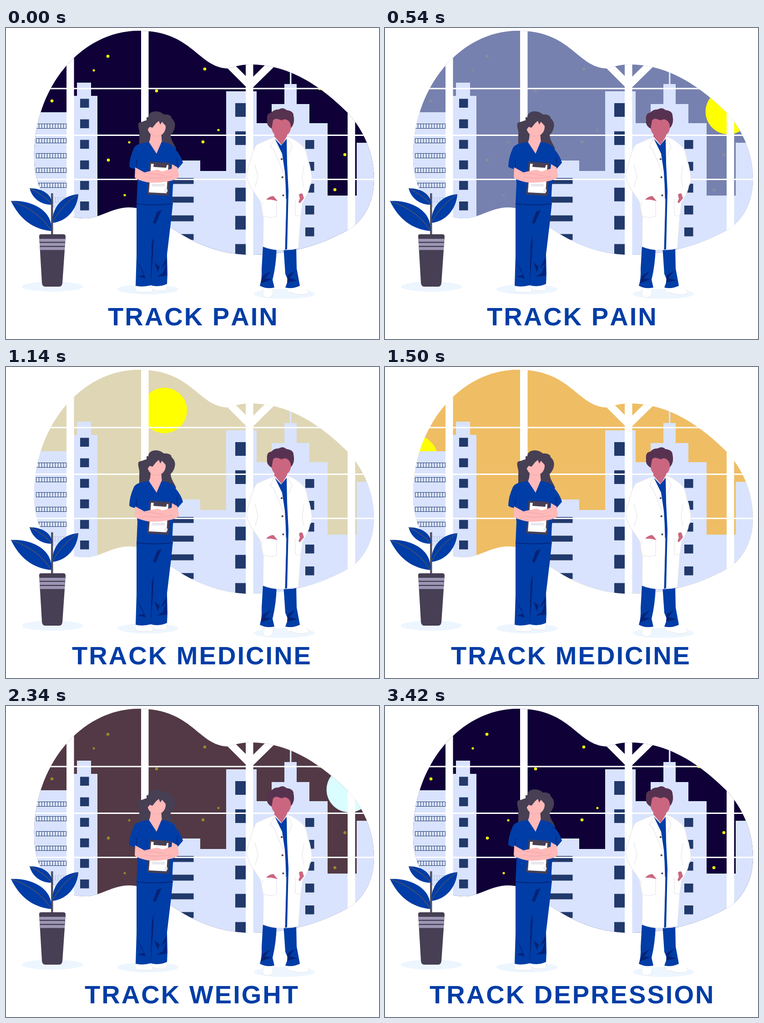
Animation of 820 by 683 pixels, one loop 3600 ms. Source, as an HTML page with a canvas:

```html
<!DOCTYPE html>
<html lang="en">
<head>
<meta charset="utf-8">
<title>Health tracking</title>
<style>
html, body { margin: 0; width: 100%; height: 100%; overflow: hidden; background: #fff; }
canvas { display: block; width: 820px; height: 683px; }
</style>
</head>
<body>
<canvas id="stage" width="820" height="683"></canvas>
<script>
const ctx = document.getElementById('stage').getContext('2d');

const LOOP = 3600, STEP = 60, LAST = 3420, HALF = LOOP / 2, QUARTER = LOOP / 4;
const BLUE = '#003da6', NAVY = '#21396b', FOLD = '#062276', TOWER = '#d9e3fd';
const PLUM = '#473f53', STEM = '#515064', SKIN = '#ffb9b9', ROSE = '#cb6680', GREY = '#e4e4e8';
const NIGHT = [15, 0, 55], DAY = [186, 213, 252], SAND = [223, 214, 181], AMBER = [239, 189, 100];

const captions = [
  ['TRACK PAIN', 224], ['TRACK MEDICINE', 145],
  ['TRACK WEIGHT', 173], ['TRACK DEPRESSION', 98]
];
const skyStops = [[0, NIGHT], [890, DAY], [1140, SAND], [1500, AMBER], [2700, NIGHT]];

const blob = new Path2D(`M62 290C58 132 165 6 292 6C410 6 422 87 488 89C503 84 520 80 537 80
  C620 80 690 125 751 186C790 228 809 280 809 332C809 385 785 425 751 444
  C690 478 620 498 540 498C465 498 410 470 365 440C335 417 310 394 270 394
  C235 394 205 418 175 418C95 418 62 345 62 290Z`);

function fill(color, d) {
  ctx.fillStyle = color;
  ctx.fill(new Path2D(d));
}

function line(color, width, d) {
  ctx.strokeStyle = color;
  ctx.lineWidth = width;
  ctx.stroke(new Path2D(d));
}

function rect(color, x, y, w, h) {
  ctx.fillStyle = color;
  ctx.fillRect(x, y, w, h);
}

function oval(color, x, y, rx, ry = rx) {
  ctx.fillStyle = color;
  ctx.beginPath();
  ctx.ellipse(x, y, rx, ry, 0, 0, 7);
  ctx.fill();
}

const clamp = v => Math.max(0, Math.min(1, v));

function skyColor(t) {
  const i = Math.max(1, skyStops.findIndex(([time]) => time > t));
  if (t >= 2700) return NIGHT;
  const [t0, from] = skyStops[i - 1], [t1, to] = skyStops[i];
  return from.map((v, j) => Math.round(v + (to[j] - v) * (t - t0) / (t1 - t0)));
}

function drawSky(t) {
  rect(`rgb(${skyColor(t)})`, 0, 0, 820, 500);

  // Zero-length round strokes make the stars
  ctx.globalAlpha = clamp(1 - t / 600) + clamp((t - 2100) / 600);
  ctx.lineCap = 'round';
  line('#ff0', 6.7, `M224 62h0M101 160h0M331 138h0M437 90h0M225 290h0M433 250h0
    M690 133h0M745 278h0M723 355h0`);
  line('#ff0', 5.1, 'M193 93h0M271 251h0M467 224h0M261 367h0');
  ctx.lineCap = 'butt';
  ctx.globalAlpha = 1;

  // Sun and moon share one arc, half a loop apart, fastest near the top
  const x = 323 - 608 * Math.atan((t % HALF - 1170) / 733);
  const y = 731 - Math.sqrt(Math.max(0, 640 ** 2 - (x - 423) ** 2));
  oval(t < HALF ? '#ff0' : '#dafeff', x, y, 50);
}

function drawCity() {
  fill(TOWER, `M60 500V185H145V149H156V120H187V149H201V500H350V291H427V314H484V139H551V209H584
    V167H612V123H624V90H627.5V123H639V167H667V209H707V368H771V252H820V500Z`);

  ctx.strokeStyle = NAVY;
  ctx.lineWidth = 1;
  for (let row = 0; row < 6; row++) {
    ctx.globalAlpha = row < 5 ? 1 : 0.13;
    for (let x = 66.5; x < 133; x += 6) ctx.strokeRect(x, Math.round(210 + row * 32.4) + 0.5, 6, 10);
  }
  ctx.globalAlpha = 1;

  for (let i = 0; i < 6; i++) {
    rect(NAVY, 163, 155.5 + i * 45.1, 19.5, 19.5);
    rect(NAVY, 504, 165 + i * 61.9, 26, 30);
    if (i < 5) rect(NAVY, 658, 246 + i * 48, 19.5, 19.5);
    if (i < 4) rect(NAVY, 355, 329.5 + i * 41, 57.5, 13);
  }
}

function drawWindow() {
  for (const x of [133, 297, 527, 751]) rect('#fff', x, 0, 16.5, 500);
  for (const y of [131.5, 234, 331]) rect('#fff', 0, y, 820, 3);
  line('#fff', 16.5, 'M470 60L536 126L603 60');
}

function drawPlant() {
  rect(STEM, 99, 363, 4.5, 92);
  fill(BLUE, `M11 380C50 377 104 397 100 446C58 442 29 418 11 380Z
    M52 352C80 352 101 365 102 388C79 389 58 376 52 352Z
    M159 365C157 397 134 425 102 428C101 390 128 367 159 365Z`);
  line(STEM, 1.4, 'M11 380Q72 400 100 446M52 352Q82 366 102 388M159 365Q122 390 102 427');
  fill(PLUM, 'M77 453H126Q131 453 131 458L124 560Q123 568 117 568H86Q80 568 79 560L73 459Q72 453 77 453Z');
  for (let i = 0; i < 3; i++) rect('#9d97b5', 73 + i, 463 + i * 9, 57 - i * 1.5, 6.5);
}

function drawNurse() {
  fill('#fff', 'M286 568Q282 580 292 580H322Q326 572 314 566ZM318 566Q323 577 333 577H351Q357 570 350 562Z');
  line(GREY, 1, 'M285 572Q283 580 292 580H322Q326 574 318 569M322 573Q326 577 334 577H351Q357 571 352 565');

  // Hair, neck and face
  fill(PLUM, `M313 197C312 188 320 183 329 183S344 187 347 190C358 189 364 193 364 198
    Q374 206 371 219Q369 228 362 235C362 247 372 257 374 266L350 268H293V235
    C295 228 289 217 291 210C292 206 299 207 304 204Q312 203 313 197Z`);
  fill(SKIN, 'M318 230H341L343 254L331 279L313 253Q318 246 318 230Z');
  oval(SKIN, 331, 217.5, 20, 20.5);
  fill(PLUM, 'M309 226L316 217L322 219L330 209L336 204L339 212L343 206L352 216V196H309Z');
  line('#eda9ad', 1, 'M319 234Q330 241 341 235');

  // Trousers
  fill(BLUE, 'M287 384H367L362 430L354 497L355 540L354 562Q337 570 318 565Q299 570 285 566L287 500Z');
  fill(FOLD, `M287 510L300 532L307 550L290 546L303 542ZM326 515L338 524L334 536Z
    M353 504L340 529L352 517L345 538L332 546L353 544ZM329 430L342 400L332 404L323 428Z
    M320 475L325 456L323 500L318 565Z`);

  // Top
  fill(BLUE, `M314 250C300 253 286 254 281 264Q271 286 271 305Q278 310 286 309L289 340L287 387
    Q326 392 365 387L367 345L377 310L389 296Q385 281 373 267C369 254 353 252 342 250L331 276Z`);
  line(FOLD, 1.3, 'M287 386Q326 391 366 386M286 309L287 290M377 306L376 285');

  // Clipboard and arms
  line(PLUM, 5, 'M318 296L359 299L355 366L313 363Z');
  fill('#fff', 'M319 298L357 301L353 363L314 361Z');
  fill(PLUM, 'M325 298L354 300L352 307L324 305Z');
  fill('#e7e8ef', 'M321 342H349V348H321ZM349 354H355V360H348Z');
  fill(SKIN, `M284 306L304 317L333 311L344 315L364 309L365 299L377 306L380 324
    C380 330 370 334 360 336C342 340 319 341 307 338C297 335 286 333 283 328Z`);
  line('#eda2a8', 1, 'M302 318Q326 320 348 324M304 327Q326 333 365 326');
}

function drawDoctor() {
  fill('#fff', 'M567 570Q560 592 575 592T587 571ZM618 570Q614 582 627 581Q643 588 663 584Q674 575 645 567Z');
  line(GREY, 1, 'M566 573Q560 592 575 592T587 572M618 573Q614 582 627 581Q643 588 663 584Q669 578 661 574');

  // Trousers
  fill(BLUE, `M565 478L595 482Q594 520 586 553L590 570Q572 574 558 566Q563 551 562 529Z
    M610 480L638 479L639 528L646 566Q630 574 614 570L620 554L614 540Z`);
  fill(FOLD, 'M565 544L582 534L569 550L584 552L560 561ZM619 543L636 533L623 549L640 554L618 559Z');

  // Head
  fill(ROSE, 'M590 230L618 228V248L609 264L590 243Z');
  fill(ROSE, 'M583 200V214Q584 238 605 238T627 214V198Z');
  fill('#573250', `M584 221Q572 214 574 203Q572 187 583 186Q590 178 599 179Q609 173 616 180
    Q632 182 632 192Q636 210 626 220Q627 211 622 205Q614 197 606 203Q592 196 587 203Z`);

  // Coat, scrubs, seams
  const coat = `M591 240L576 245L551 256C544 265 541 278 537 291L530 316
    C526 326 535 344 539 351L559 381L566 416L565 480Q590 490 618 487Q634 487 643 483
    L648 413L652 383Q666 362 668 346Q675 337 671 318L667 299C661 285 663 271 654 261
    Q645 252 630 243L618 238L606 258Z`;
  fill('#fff', coat);
  line(GREY, 1.2, coat);
  fill(BLUE, 'M591 243L605 258L617 243L618 298L621 358L618 486L613 487L615 425Q617 370 613 316L607 276Z');
  line(GREY, 1.2, `M590 242L581 261L588 266L611 320M618 240L629 260L621 279M616 375L613 486
    M547 300L554 326L548 349M655 302L651 330L655 350
    M565 383Q560 388 562 412Q580 419 595 414V379M636 376V411Q645 415 650 411`);

  // Hands and buttons
  fill(ROSE, 'M572 377Q579 369 588 369L597 380L583 377ZM644 366Q647 362 652 364L655 374L646 385L643 382L646 375Z');
  for (let i = 0; i < 3; i++) oval('#55515a', 606 + i * 1.7, 288 + i * 39.8, 2.2);
}

function drawCaption(t) {
  const [text, x] = captions[Math.floor(t / QUARTER)];
  ctx.font = 'bold 56px "Liberation Sans", Arial, sans-serif';
  ctx.letterSpacing = '3.05px';
  ctx.fontKerning = 'none';
  ctx.fillStyle = BLUE;
  ctx.fillText(text, x, 653);
}

function render(now) {
  const t = Math.min(LAST, Math.floor((now % LOOP) / STEP) * STEP);
  rect('#fff', 0, 0, 820, 683);
  ctx.save();
  ctx.clip(blob);
  drawSky(t);
  drawCity();
  drawWindow();
  ctx.restore();
  for (const [x, y] of [[102, 568], [312, 574], [612, 584]]) oval('#edf6ff', x, y, 67, 11);
  drawPlant();
  drawNurse();
  drawDoctor();
  drawCaption(t);
}

const start = performance.now();
function tick() {
  render(performance.now() - start);
  requestAnimationFrame(tick);
}
tick();
</script>
</body>
</html>
```
